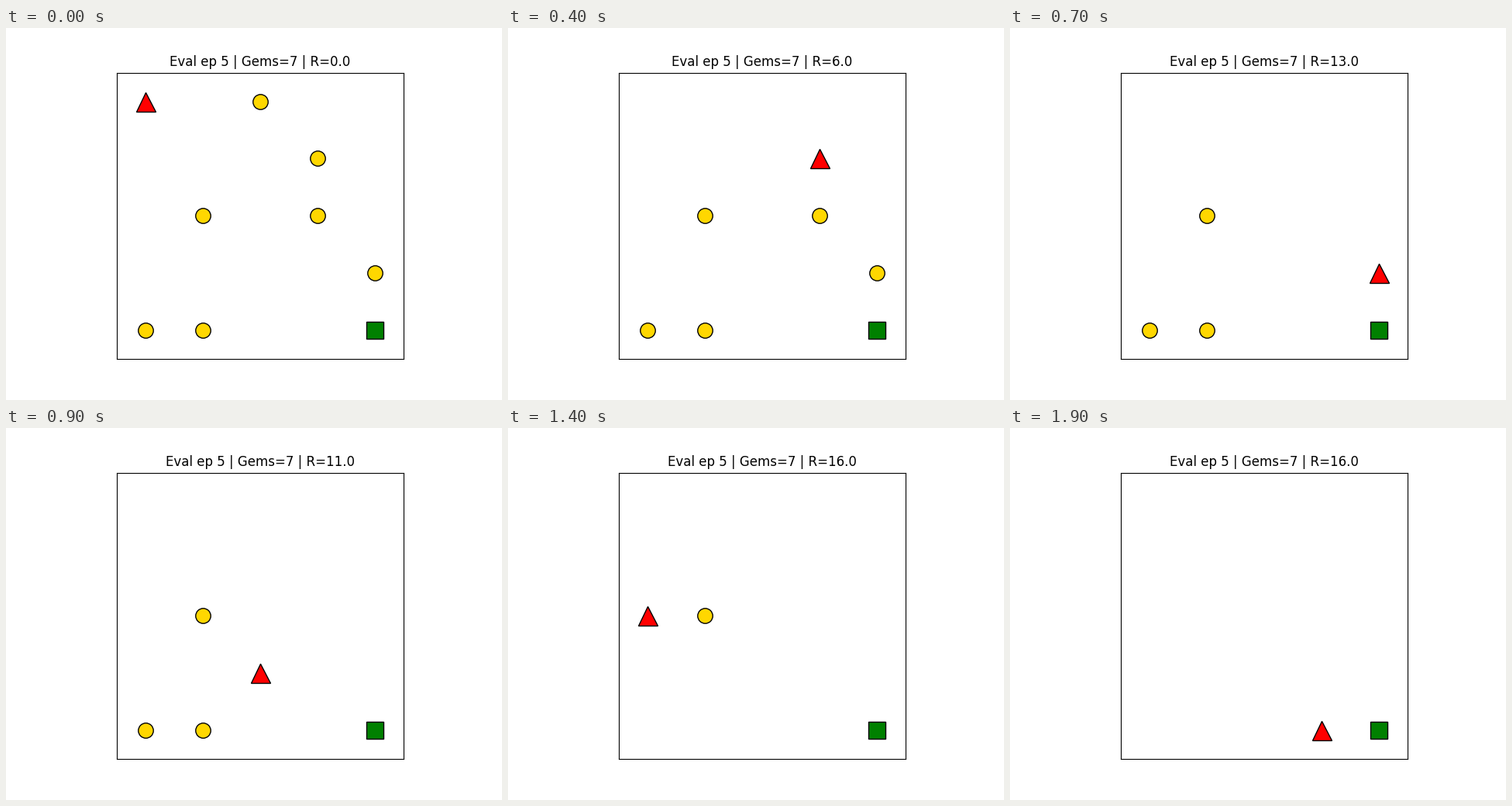
Animation, 640 px wide and 480 px high, one loop 2000 ms. Source, as a matplotlib script:

```python
import matplotlib.pyplot as plt
from matplotlib.animation import FuncAnimation

SIZE = 5
GOAL = (4, 4)
GEMS = [(2, 0), (3, 1), (1, 2), (3, 2), (4, 3), (0, 4), (1, 4)]
MOVES = "RRRDDRDLLLDLUURDRDR"
STEP = {"R": (1, 0), "L": (-1, 0), "U": (0, -1), "D": (0, 1)}
GEM_REWARD, STEP_COST = 5, 1

path = [(0, 0)]
for move in MOVES:
    dx, dy = STEP[move]
    path.append((path[-1][0] + dx, path[-1][1] + dy))

plt.rcParams["font.family"] = "DejaVu Sans"
fig, ax = plt.subplots(figsize=(6.4, 4.8), dpi=100)
ax.set_xlim(-0.5, SIZE - 0.5)
ax.set_ylim(SIZE - 0.5, -0.5)
ax.set_aspect("equal")
ax.set_xticks([])
ax.set_yticks([])


def marks(cells, shape, color, size):
    xs, ys = zip(*cells)
    return ax.plot(xs, ys, shape, ms=size, mfc=color, mec="black", ls="none")[0]


gems = marks(GEMS, "o", "gold", 14)
goal = marks([GOAL], "s", "green", 16)
agent = marks(path[:1], "^", "red", 18)
title = ax.set_title("")


def draw(i):
    visited = path[:i + 1]
    left = [g for g in GEMS if g not in visited]
    reward = GEM_REWARD * (len(GEMS) - len(left)) - STEP_COST * i
    gems.set_data([g[0] for g in left], [g[1] for g in left])
    agent.set_data([path[i][0]], [path[i][1]])
    title.set_text(f"Eval ep 5 | Gems={len(GEMS)} | R={reward:.1f}")
    return gems, agent, title


anim = FuncAnimation(fig, draw, frames=len(path), interval=100,
                     init_func=lambda: draw(0), repeat=True, repeat_delay=0)
plt.show()
```
